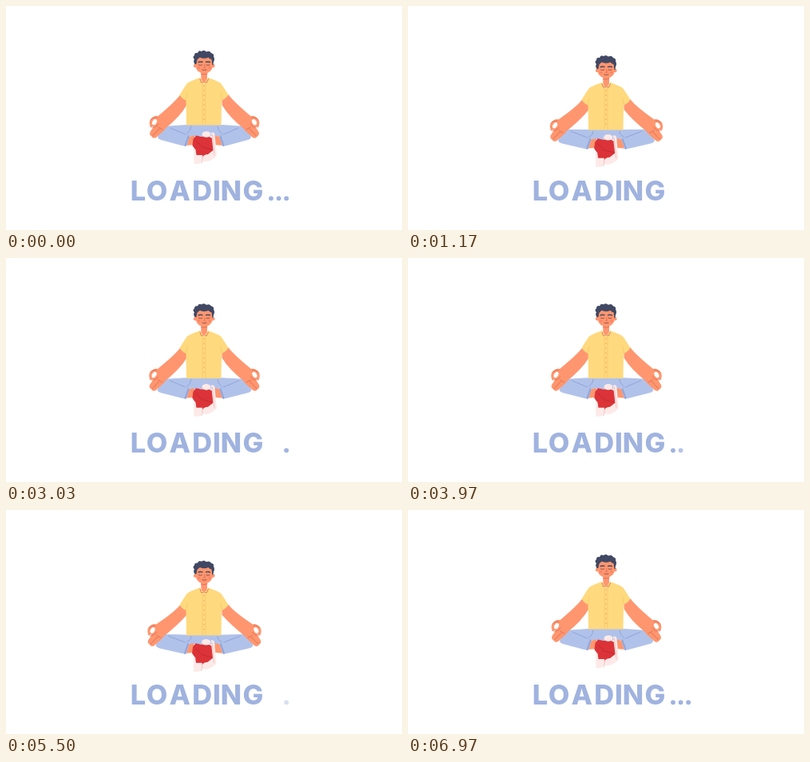
These frames come from a looping animation (496x281 px, 7.01 s). An HTML page:

```html
<!DOCTYPE html>
<html lang="en">
<head>
<meta charset="utf-8">
<title>Loading</title>
<style>
  html, body { margin: 0; width: 100%; height: 100%; overflow: hidden; background: #fff; }
  svg { display: block; width: 100vw; height: 100vh; }
  text { font: 800 34.4px Inter, Roboto, sans-serif; text-anchor: middle; }
  .line { fill: none; stroke-linecap: round; stroke-linejoin: round; }
  .skin { fill: #ff966f; }
  .crease { stroke: #d9694f; stroke-width: .8; }
  .jeans { fill: #b1c2ea; }
  .seam { stroke: #8fa5d8; stroke-width: 1; }
  .shirt { fill: #ffd97e; }
  .stitch { stroke: #f7c568; stroke-width: .7; }
  .hair { fill: #414863; }
  .red { fill: #db3338; }
  .sole { fill: #fdeae8; }
</style>
</head>
<body>
<svg viewBox="0 0 496 281">
  <defs>
    <g id="leg">
      <path id="thigh" class="jeans"/>
      <path id="fold" class="line seam"/>
      <g class="foot">
        <path class="skin" d="M227 164L236 162.5L237 174L225 175Z"/>
        <path class="jeans" d="M225 161L230 163L226 176L221 175Z"/>
        <path class="line seam" style="stroke-width:2" d="M228.5 163.5L224.5 175"/>
      </g>
    </g>
    <g id="arm">
      <path id="limb" class="skin"/>
      <g id="hand">
        <path class="skin" d="M190 138L204 148L198 156L188 165Q184 167 182.5 163.5Q179 162 180.5 158L185 151L180.5 151Q178 144 183 140Q187 137 190 138Z"/>
        <ellipse cx="186" cy="145.6" rx="2.6" ry="4" transform="rotate(30 186 145.6)" fill="#fff"/>
        <path class="line crease" d="M181 151.5Q187 154 191 148M183.5 163L192 154M191 152L196 155M181 143Q184 139 189 140"/>
      </g>
    </g>
  </defs>

  <g id="figure">
    <use href="#leg"/>
    <use href="#leg" transform="translate(497) scale(-1 1)"/>
    <g class="foot">
      <path class="red" d="M234.5 167L238 162.5L245 164L252 163L259 166L262 178L259 185L252 187L246 190L236 187L237 180L233.5 175Z"/>
      <path class="sole" d="M235 179L237.5 180L238.5 187L246 187Q248 195 242 198H235.5Z"/>
      <path class="sole" d="M257 159Q260.5 157.5 261.5 161L264 188L259 192Q251 198 245 193Q246 186 253 186L259.5 181Z"/>
      <ellipse class="sole" cx="251" cy="161" rx="5.5" ry="3.8"/>
      <path class="line" stroke="#c02a33" stroke-width=".9" d="M238 169L246 177L258 180"/>
      <path class="line" stroke="#e8b9b6" stroke-width=".8" d="M258.5 161L261 187M246 189Q247 194 245 197"/>
    </g>
    <use href="#arm"/>
    <use href="#arm" transform="translate(497) scale(-1 1)"/>

    <g id="torso">
      <path class="shirt" d="M243 90Q230 94 226.5 97.5Q222 104 217.5 111.5Q220 116 225.5 118.5L226 149.6H269.5L270 118.5Q276 116 278.5 111.5Q274 104 269.5 97.5Q266 94 253 90L248 97Z"/>
      <path class="line stitch" d="M227 109L225.5 118M269 109L270 118M246 97V149M250 97V149"/>
      <path class="line" stroke="#e79a56" stroke-width="1.4" stroke-dasharray="0 6" d="M248 100V148"/>
      <path class="skin" d="M244.3 80H252V90Q252 94 248 95.5Q244.3 94 244.3 90Z"/>
      <path class="line crease" d="M244.5 85.5Q248 87 252 85M243 91.5L244.5 96L248 95.5L251.5 96L253.5 91.5"/>
      <circle class="skin" cx="237" cy="75" r="2.2"/>
      <circle class="skin" cx="259.4" cy="75" r="2.2"/>
      <path class="skin" d="M237.5 63H259V76Q257 84.5 248.2 84.5Q239.5 84.5 237.5 76Z"/>
      <path class="hair" d="M236.5 73Q234 69 236 67Q233 64 236 62Q236 58 240 59Q241 55 245 57Q248 54.5 251 57.5Q255 55.5 257 59Q261 60 260 63Q262 67 260 70L259.5 74H258.4L257.5 67Q255 66.5 253.5 64.5Q248 67 243 64.5Q241 65.5 239.5 67.5L238.3 73Z"/>
      <path class="line" stroke="#414863" stroke-width="1.4" d="M241 70.5Q243 69.5 246 70.3M250.5 70.3Q253.5 69.5 255.5 70.5"/>
      <path class="line" stroke="#8c4b48" stroke-width=".9" d="M241.5 74Q243.5 75 245.5 74M251 74Q253 75 255 74M246 80Q248.5 81 251 80"/>
      <path class="line crease" d="M248.5 73.5L249.3 77.5H247.7"/>
      <g fill="#f9846a"><circle cx="241.5" cy="77.5" r="1.6"/><circle cx="255" cy="77.5" r="1.6"/></g>
    </g>
  </g>

  <g fill="#a0b3df">
    <text x="165.5 189 217.7 245.6 263.8 281.8 309.5" y="244">LOADING</text>
    <circle class="dot" cx="332" cy="241.3" r="2.9"/>
    <circle class="dot" cx="341.6" cy="241.3" r="2.9"/>
    <circle class="dot" cx="351.2" cy="241.3" r="2.9"/>
  </g>
</svg>
<script>
  const LOOP = 7010, FLOAT = LOOP / 2, CYCLE = LOOP / 3, STEP = CYCLE / 10;
  const HIDE = 225, SHOW = 1222;
  const $ = id => document.getElementById(id);
  const feet = document.querySelectorAll('.foot'), dots = document.querySelectorAll('.dot');
  const clamp = v => Math.max(0, Math.min(1, v));
  const move = (el, x, y) => el.setAttribute('transform', `translate(${x} ${y})`);
  const shape = (id, d) => $(id).setAttribute('d', d);

  function draw(now) {
    const t = now % LOOP;
    const k = (1 - Math.cos(2 * Math.PI * t / FLOAT)) / 2;
    const body = 8 * k, low = 5 * k, handX = -2.5 * k, handY = 5.5 * k;
    const hip = (x, y) => `${x} ${y + body}`;
    const foot = (x, y) => `${x} ${y + low}`;
    const outer = (x, y) => `${x + handX} ${y + handY}`;

    move($('torso'), 0, body);
    move($('hand'), handX, handY);
    feet.forEach(el => move(el, -.5 * k, low));
    shape('thigh', `M${hip(249, 149)}L${hip(226, 149)}L${outer(203, 150.5)}Q${outer(196, 152)} ${outer(190, 164)}Q${outer(190, 167)} ${outer(196, 168.5)}L${foot(222, 175.5)}L${foot(228, 163)}L${foot(249, 164)}Z`);
    shape('fold', `M${outer(206, 153)}L${foot(229, 163)}M${hip(232, 151)}Q${hip(232, 156)} ${foot(227, 160)}`);
    shape('limb', `M${hip(218.5, 111)}Q${hip(212, 120)} ${outer(190, 138.5)}L${outer(199, 154)}Q${outer(218, 139)} ${hip(226.5, 124)}V${113 + body}Z`);

    // Dots fade out one after another, then return in the same order.
    const phase = t % CYCLE;
    dots.forEach((dot, i) => {
      const gone = clamp((phase - HIDE) / STEP - i);
      const back = clamp((phase - SHOW) / STEP - i);
      dot.setAttribute('opacity', 1 - gone + back);
    });
  }

  const start = performance.now();
  function tick() {
    draw(performance.now() - start);
    requestAnimationFrame(tick);
  }
  tick();
</script>
</body>
</html>
```
